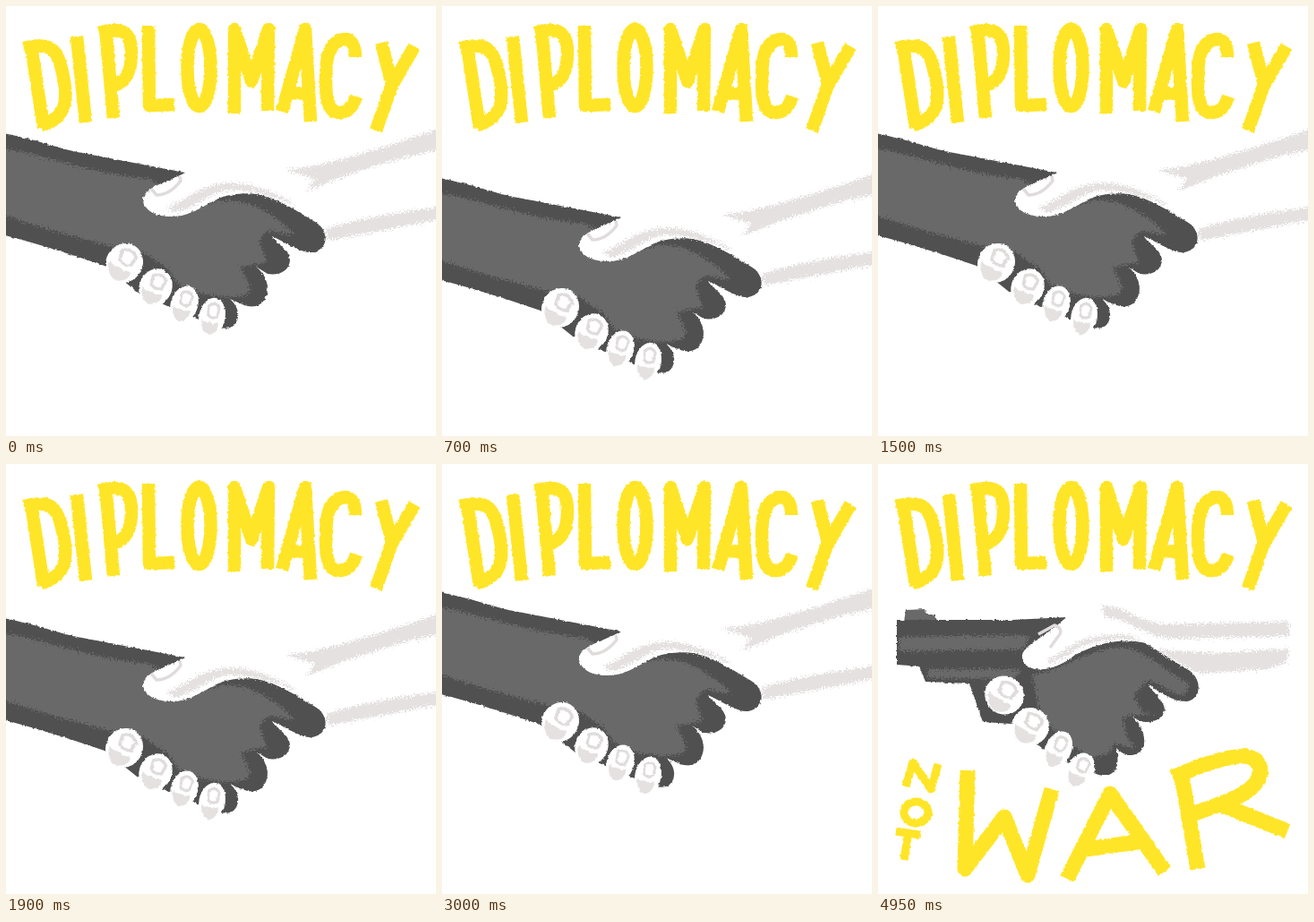
Recreate the animation shown at these times as an HTML page. Size 480 by 480 pixels, loop 5 s.

```html
<!DOCTYPE html>
<html lang="en">
<head>
<meta charset="utf-8">
<title>Diplomacy not war</title>
<style>
  html, body { margin: 0; height: 100%; overflow: hidden; background: #fff; }
  svg { display: block; width: 100%; height: 100%; }
  .ink { fill: none; stroke: #ffe527; stroke-width: 14.5; stroke-linejoin: round; }
  .small { stroke-width: 9; }
  .big { stroke-width: 17; }
  .dark { fill: #505050; }
  .mid { fill: #696969; }
  .white { fill: #fff; }
  .shade { fill: #e5e1e1; }
  .nail { fill: none; stroke: #e0dcdc; stroke-width: 3.5; stroke-linejoin: round; }
  .rough { filter: url(#rough); }
  .grain { filter: url(#grain); }
</style>
</head>
<body>
<svg viewBox="0 0 480 480">
  <defs>
    <filter id="rough" filterUnits="userSpaceOnUse" x="0" y="0" width="480" height="480" color-interpolation-filters="sRGB">
      <feTurbulence type="fractalNoise" baseFrequency=".3" numOctaves="2"/>
      <feDisplacementMap in="SourceGraphic" scale="3" xChannelSelector="R" yChannelSelector="G"/>
    </filter>
    <filter id="grain" filterUnits="userSpaceOnUse" x="0" y="0" width="480" height="480" color-interpolation-filters="sRGB">
      <feTurbulence type="fractalNoise" baseFrequency=".55" numOctaves="2"/>
      <feDisplacementMap in="SourceGraphic" scale="13" xChannelSelector="R" yChannelSelector="G"/>
    </filter>
    <g id="finger">
      <ellipse class="white" rx="19" ry="23"/>
      <path class="shade" d="M-14 5 C-8 11 -3 4 3 8 L10 5 C14 12 7 21 0 22 C-8 21 -14 13 -14 5Z"/>
      <path class="nail" d="M-6 -1 L-8 -12 Q0 -20 8 -12 L7 -1 Q0 3 -6 -1Z"/>
    </g>
  </defs>

  <g class="ink rough" role="img" aria-label="DIPLOMACY">
    <path d="M28 44 L42 136 M20 47 C49 40 56 48 61 66 C71 103 69 125 39 133"/>
    <path d="M79 34 L89 130"/>
    <path d="M111 24 L120 125 M104 30 C131 22 140 30 140 52 C140 74 134 85 118 90"/>
    <path d="M159 22 L160 111 L188 110"/>
    <ellipse cx="215.500" cy="69" rx="13" ry="43"/>
    <path d="M255 120 L255 26 L274 84 L293 26 L292 117"/>
    <path d="M308 118 L334 26 L340 129 M317 97 L340 98"/>
    <path d="M390 57 C390 40 383 35 374 38 C359 43 357 60 357 84 C357 109 362 120 373 119 C384 118 388 110 391 101"/>
    <path d="M419 41 L431 88 M456 45 L430 90 L413 139"/>
  </g>

  <g id="shake">
    <path class="dark rough" d="M-9 141 C40 150 60 160 85 164 L200 186 L240 208 C280 205 300 215 320 226 L345 241 C361 250 361 272 342 275 C330 276 318 267 297 257 C300 264 317 272 317 284 C316 296 305 301 292 299 L279 291 C290 300 294 312 291 322 C287 336 275 337 266 334 L250 327 C262 338 261 350 254 357 C248 361 242 360 234 358 L150 322 L110 290 C80 280 40 266 -9 254Z"/>
    <path class="mid grain" d="M-9 158 C50 167 90 187 160 193 L215 225 C250 208 280 220 308 242 L322 254 C314 258 300 248 290 253 L283 263 L291 286 L262 291 L272 313 C274 326 255 323 247 325 L220 322 L192 310 L180 293 L155 276 L117 268 C75 257 30 245 -9 231Z"/>
    <path class="white rough" d="M153 218 C151 203 180 197 200 186 C225 174 275 178 310 182 L375 185 L372 247 L357 248 C350 238 310 222 298 214 C280 207 258 209 245 212 C225 218 210 235 185 235 C165 235 156 228 153 218Z"/>
    <path class="shade grain" d="M180 225 C207 213 218 200 245 198 C275 196 305 210 325 223 C300 215 280 204 245 206 C220 212 210 228 187 230Z"/>
    <path class="nail" d="M162 204 L168 211 Q183 211 195 195 L194 190"/>
    <path class="shade grain" d="M312 183 C360 179 420 158 490 135 L490 159 C435 169 382 187 335 207 L345 193Z"/>
    <path class="shade grain" d="M357 249 C390 238 440 230 490 223 L490 237 C440 247 400 254 360 262Z"/>
    <g class="rough">
      <use href="#finger" transform="translate(132 287) rotate(30) scale(1.08 .98)"/>
      <use href="#finger" transform="translate(167 314) rotate(24) scale(.96 .92)"/>
      <use href="#finger" transform="translate(199 333) rotate(18) scale(.8 .91)"/>
      <use href="#finger" transform="translate(230 347) rotate(12) scale(.77 .93)"/>
    </g>
  </g>

  <g id="gun">
    <path class="mid rough" d="M29 176 L31 163 L52 162 L54 168 L64 168 L66 176Z"/>
    <path class="dark rough" d="M21 174 L150 174 L210 171 L230 205 C265 188 285 190 302 202 L345 229 C362 238 362 262 345 265 C330 266 315 255 302 246 C303 252 319 262 320 274 C318 286 305 290 292 287 L283 281 C297 294 300 310 295 318 C288 328 275 327 266 317 C268 328 270 342 258 347 C250 350 240 345 233 340 L200 330 L148 290 L117 288 L102 245 L53 243 L46 226 L21 224Z"/>
    <path class="mid grain" d="M24 193 L170 191 L162 207 L24 209Z"/>
    <path class="mid grain" d="M56 229 L160 229 L152 240 L56 239Z"/>
    <path class="mid grain" d="M172 235 C205 230 225 213 250 208 C280 199 295 210 318 227 L346 245 C348 258 338 261 328 254 L302 241 L285 258 L295 277 L312 280 L282 280 L273 284 L278 305 L288 318 L264 312 L258 323 L238 328 L205 306 L182 282 L176 255Z"/>
    <path class="white rough" d="M161 213 C164 201 187 193 208 173 C225 163 240 158 257 164 L345 180 L350 231 L326 217 L302 201 C270 191 240 203 220 213 C205 225 190 231 175 229 C165 227 160 220 161 213Z"/>
    <path class="shade grain" d="M190 219 C213 205 225 194 249 192 C272 189 282 189 294 198 C270 193 245 197 222 206 C210 213 202 222 190 222Z"/>
    <path class="nail" d="M179 190 L197 180 Q206 183 203 190 L192 205"/>
    <path class="shade grain" d="M250 159 C272 156 286 175 320 179 L459 176 L459 192 L330 195 C295 192 281 173 252 170Z"/>
    <path class="shade grain" d="M308 207 L380 211 L459 206 L457 221 L435 229 L358 234Z"/>
    <g class="rough">
      <use href="#finger" transform="translate(141 258) rotate(32) scale(1.16 .93)"/>
      <use href="#finger" transform="translate(170 293) rotate(32) scale(1.1 .92)"/>
      <use href="#finger" transform="translate(201 319) rotate(25) scale(.77 .94)"/>
      <use href="#finger" transform="translate(226 342) rotate(25) scale(.8 .88)"/>
    </g>
    <g class="ink small rough" role="img" aria-label="NOT">
      <path d="M31 360 L39 333 L59 363 L67 335"/>
      <ellipse cx="42.500" cy="389" rx="13.500" ry="12"/>
      <path d="M20 410 L47 414 M34 411 L29 442"/>
    </g>
    <g class="ink big rough" role="img" aria-label="WAR">
      <path d="M100 342 L97 452 L141 394 L167 459 L194 363"/>
      <path d="M211 463 L259 368 L320 455 M232 430 L296 421"/>
      <path d="M338 342 L357 452 M329 350 C365 334 405 320 419 329 C436 341 424 361 400 372 C385 379 368 385 350 391 M380 379 L457 410"/>
    </g>
  </g>
</svg>
<script>
  const LOOP = 5000, CUT = 3200, STEP = 50, PERIOD = 1470, TRAVEL = 50;
  const shake = document.getElementById('shake');
  const gun = document.getElementById('gun');
  const noises = document.querySelectorAll('feTurbulence');
  let shown = -1;

  function draw(time) {
    const t = Math.floor(time % LOOP / STEP) * STEP;
    if (t !== shown) {
      shown = t;
      const swing = (1 - Math.cos(2 * Math.PI * t / PERIOD)) / 2;
      shake.setAttribute('transform', `translate(0 ${Math.round(TRAVEL * swing ** 1.08)})`);
      shake.style.display = t < CUT ? '' : 'none';
      gun.style.display = t < CUT ? 'none' : '';
      // The brush edges are redrawn ten times a second.
      const seed = 1 + Math.floor((t + 50) / 100) % 4;
      noises.forEach(noise => noise.setAttribute('seed', seed));
    }
    requestAnimationFrame(draw);
  }
  draw(performance.now());
</script>
</body>
</html>
```
